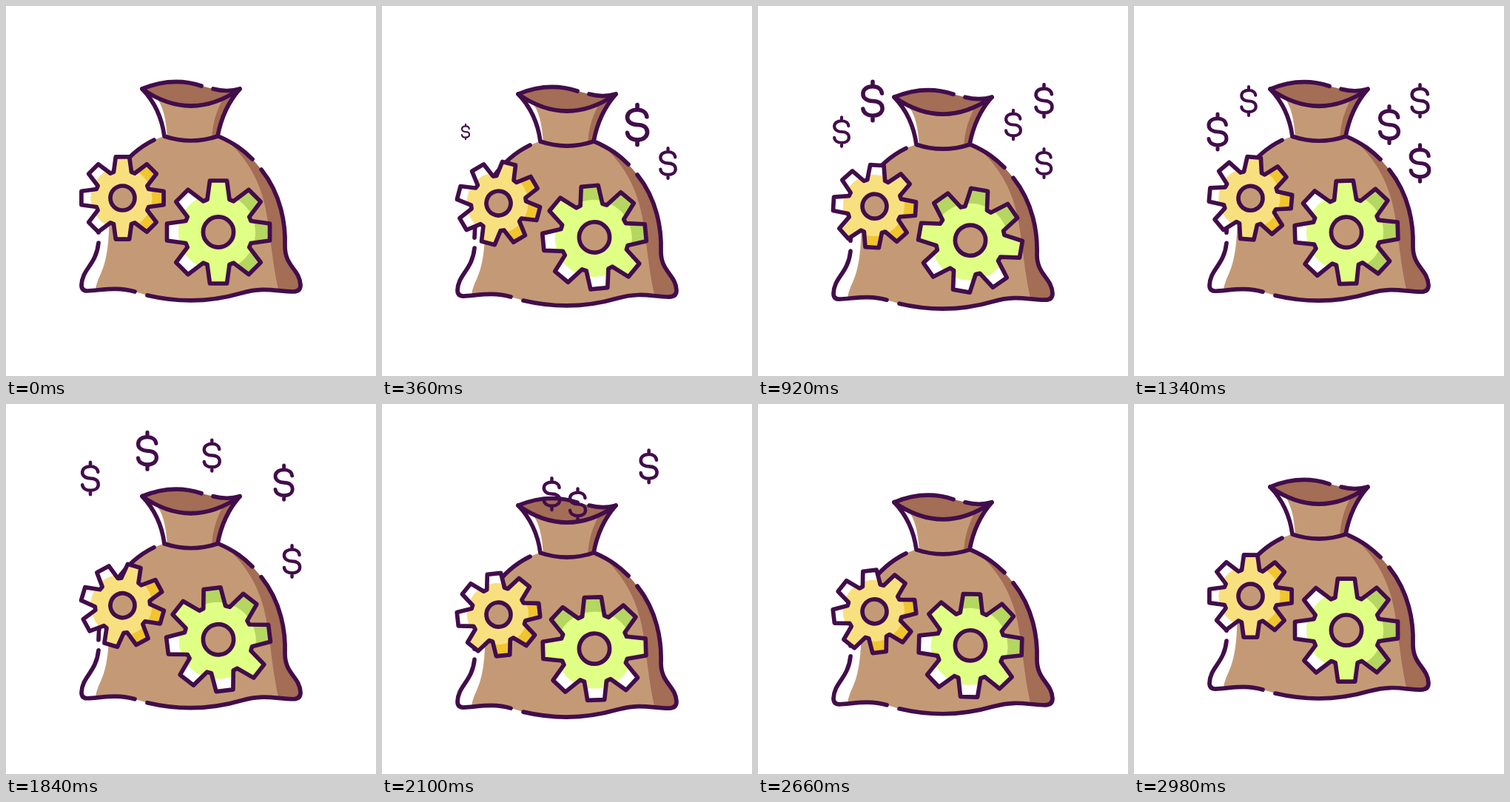
Recreate the animation shown at these times as an HTML page. Size 500 by 500 pixels, loop 3 s.

```html
<!DOCTYPE html>
<html lang="en">
<head>
<meta charset="utf-8">
<title>Money bag</title>
<style>
  html, body { margin: 0; width: 100%; height: 100%; overflow: hidden; background: #fff; }
  svg { display: block; width: 100vw; height: 100vh; }
  .line { fill: none; stroke: #420d4b; stroke-width: 5.7; stroke-linecap: round; stroke-linejoin: round; }
  .coin { stroke-width: 4.2; }
  .brown { fill: #c49a76; }
  .dark { fill: #a36d56; }
  .white { fill: #fff; }
</style>
</head>
<body>
<svg viewBox="0 0 500 500">
  <defs>
    <clipPath id="bodyClip"><path id="bodyShape" d="M213 176 L200 181 C165 198 126 240 125 306 L125 320
      C122 350 103 355 102 377 Q102 385 110 385 C130 384 150 379 174 386 L191 391
      C225 399 270 402 318 388 C350 379 365 386 388 386 Q398 386 398 377
      C397 356 377 352 377 325 C378 295 372 255 345 221 L333 207 C322 196 310 186 287 176
      Q250 188 213 176Z"/></clipPath>
    <clipPath id="neckClip"><path id="neckShape" d="M184 112 Q250 158 316 112 Q293 138 286 176 Q250 188 214 176 Q209 138 184 112Z"/></clipPath>
    <clipPath id="gearClip"><path id="gearShape"/></clipPath>
  </defs>

  <g class="bag">
    <path class="dark" d="M184 112 Q225 95 264 108 L280 112 Q299 117 316 112 Q250 158 184 112Z"/>
    <path class="line" d="M184 112 Q225 95 264 108 M280 112 Q299 117 316 112"/>
  </g>

  <g id="coins"></g>

  <g class="bag">
    <use href="#bodyShape" class="brown"/>
    <g clip-path="url(#bodyClip)">
      <path class="white" d="M90 250 H139 C141 310 138 340 128 362 Q121 375 119 395 H90Z"/>
      <path class="dark" d="M287 172 C318 196 338 225 348 262 C358 300 358 345 371 395 H410 V172Z"/>
    </g>
    <use href="#neckShape" class="brown"/>
    <g clip-path="url(#neckClip)">
      <path class="white" d="M180 108 L201 121 Q217 138 218 184 H205Z"/>
      <path class="dark" d="M298 118 Q278 148 278 184 H300 L320 108Z"/>
    </g>
    <path class="line" d="M184 112 Q250 158 316 112 Q293 138 286 176 Q250 188 214 176 Q209 138 184 112
      M200 181 C165 198 126 240 125 306
      M287 176 C310 186 322 196 333 207
      M345 221 C372 255 378 295 377 325 C377 352 397 356 398 377 Q398 386 388 386
      C365 386 350 379 318 388 C270 402 225 399 191 391
      M174 386 C150 379 130 384 110 385 Q102 385 102 377 C103 355 122 350 125 320"/>
    <g id="gears"></g>
  </g>
</svg>

<script>
const LOOP = 3000;
const FLIGHT = 420;
const MOUTH = 249;
const $ = id => document.getElementById(id);

function add(parent, tag, attrs) {
  const el = document.createElementNS('http://www.w3.org/2000/svg', tag);
  for (const key in attrs) el.setAttribute(key, attrs[key]);
  return parent.appendChild(el);
}

// Sine ease from 0 at time a to 1 at time b
function ease(t, a, b) {
  const u = Math.min(1, Math.max(0, (t - a) / (b - a)));
  return 0.5 - 0.5 * Math.cos(Math.PI * u);
}

// Rises from a to b, falls from c to d
const hump = (t, a, b, c, d) => ease(t, a, b) - ease(t, c, d);
const bob = (t, a, peak, b) => hump(t, a, peak, peak, b);

const bagDrop = t => 14 * bob(t, 0, 720, 1400)
  + 26 * hump(t, 1510, 2180, 2520, 3000) - 4 * bob(t, 2180, 2340, 2520);
const yellowTurn = t => 55 * (bob(t, 150, 760, 1480) + bob(t, 1480, 2460, 3000));
const greenTurn = t => -100 * (bob(t, 0, 720, 1400) + bob(t, 1400, 2260, 3000));

// Eight-tooth wheel
const tooth = [[-15, -44], [-11.5, -69.5], [11.5, -69.5], [15, -44]];
const rim = [];
for (let i = 0; i < 8; i++) {
  const c = Math.cos(i * Math.PI / 4), s = Math.sin(i * Math.PI / 4);
  for (const [x, y] of tooth) rim.push((x * c - y * s).toFixed(2) + ' ' + (x * s + y * c).toFixed(2));
}
const gearPath = 'M' + rim.join('L') + 'Z';
$('gearShape').setAttribute('d', gearPath);

function makeGear(x, y, size, main, shade, turn) {
  const place = add($('gears'), 'g', { transform: `translate(${x} ${y}) scale(${size})` });
  const spin = add(place, 'g', {});
  const fill = add(spin, 'g', { 'clip-path': 'url(#gearClip)' });
  add(fill, 'rect', { x: -75, y: -75, width: 75, height: 150, fill: '#fff' });
  add(fill, 'rect', { x: 0, y: -75, width: 75, height: 150, fill: shade });
  add(fill, 'circle', { cx: -2, r: 52, fill: main });
  add(fill, 'rect', { x: -17, y: -75, width: 34, height: 150, fill: main });
  const width = `stroke-width:${5.7 / size}`;
  add(spin, 'path', { d: gearPath, class: 'line', style: width });
  add(spin, 'circle', { r: 20.6, class: 'line', style: width + ';fill:#c49a76' });
  return { spin, turn };
}

const gears = [
  makeGear(157.5, 259.5, 0.8, '#f9e07f', '#f0c52e', yellowTurn),
  makeGear(287, 305.5, 1, '#e0ff85', '#b5d660', greenTurn)
];

const glyph = 'M0 -20V-15 M9.5 -8C9 -12.5 5 -15 0 -15C-6 -15 -10 -12 -10 -7.5C-10 -2.5 -5 0 0 0' +
  'C6 0 10 2.5 10 7.5C10 12 6 15 0 15C-5 15 -9.5 12.5 -10 8 M0 15V20';

// x, y: resting place; born, go: pop-up and take-off times; cx, cy: where the arc leans
const coins = [
  { x: 345, y: 160.5, born: 120, go: 1575, cx: 345, cy: 0 },
  { x: 386.5, y: 212.5, born: 200, go: 1985, cx: 386, cy: 0 },
  { x: 113, y: 170, born: 260, go: 1773, cx: 88, cy: 0 },
  { x: 386.5, y: 128, born: 400, go: 1769, cx: 386, cy: 93 },
  { x: 155, y: 128.5, born: 600, go: 1664, cx: 155, cy: 52 }
];
for (const coin of coins) coin.el = add($('coins'), 'path', { d: glyph, class: 'line coin' });

// Pops up, then throbs ever more gently
function coinSize(age) {
  if (age < 240) return 1.35 * ease(age, 0, 240);
  const k = age - 240;
  return 1.13 + 0.22 * Math.cos(k * Math.PI / 500) * Math.exp(-k / 1500);
}

function bezier(u, a, b, c, d) {
  const v = 1 - u;
  return v * v * v * a + 3 * v * v * u * b + 3 * v * u * u * c + u * u * u * d;
}

function drawCoin(coin, t) {
  const u = Math.max(0, (t - coin.go) / FLIGHT);
  const shown = t > coin.born && u < 1;
  coin.el.style.display = shown ? '' : 'none';
  if (!shown) return;
  const x = bezier(u, coin.x, coin.cx, MOUTH, MOUTH);
  const y = bezier(u, coin.y, coin.cy, -10, 260);
  coin.el.setAttribute('transform', `translate(${x} ${y}) scale(${coinSize(t - coin.born)})`);
}

const bags = document.querySelectorAll('.bag');

function draw(t) {
  const drop = bagDrop(t);
  bags.forEach(el => el.setAttribute('transform', `translate(0 ${drop})`));
  for (const g of gears) g.spin.setAttribute('transform', `rotate(${g.turn(t)})`);
  for (const coin of coins) drawCoin(coin, t);
}

const start = performance.now();
function frame() {
  draw((performance.now() - start) % LOOP);
  requestAnimationFrame(frame);
}
frame();
</script>
</body>
</html>
```
